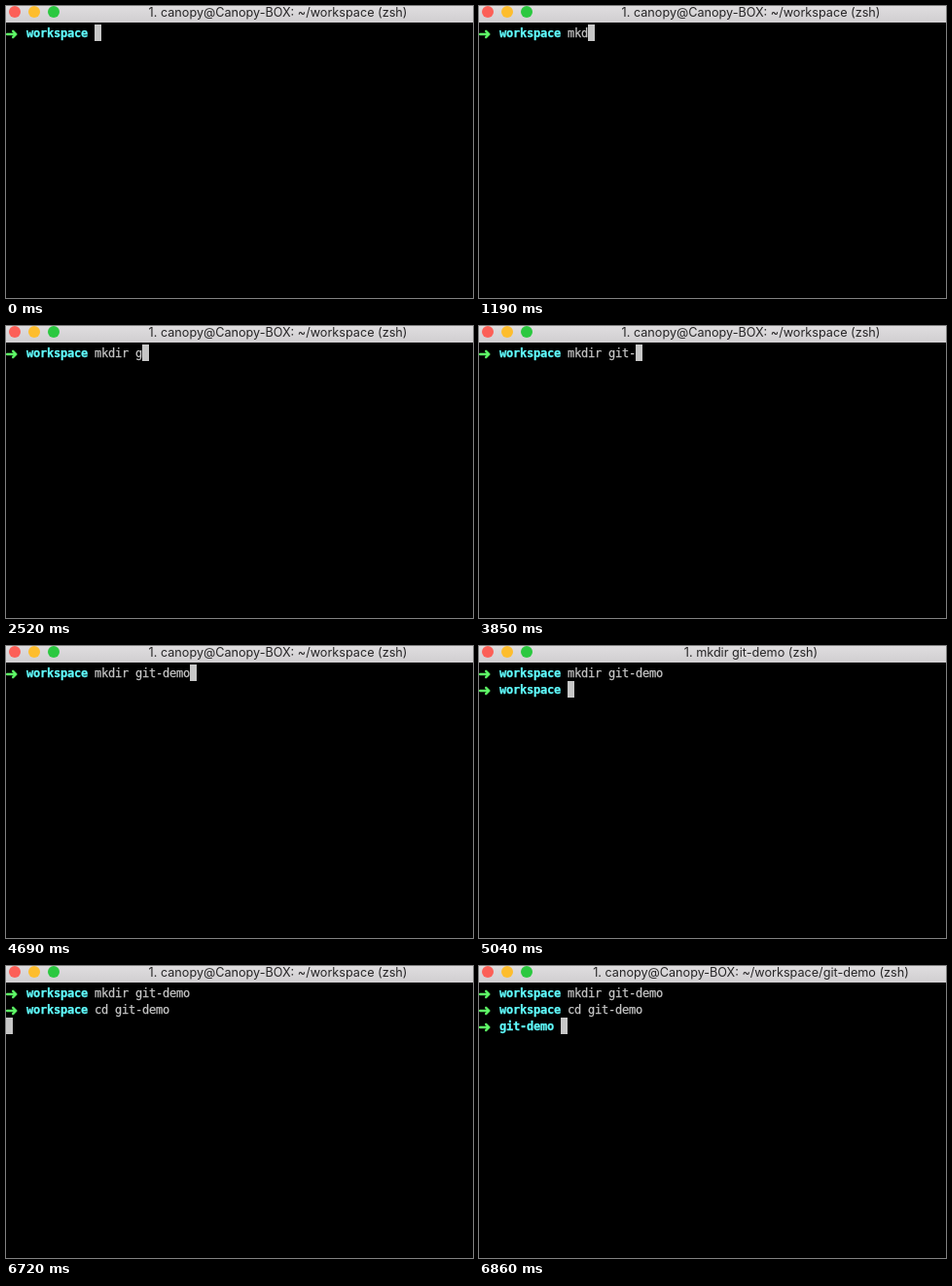
These frames come from a looping animation (480 by 300 pixels, 8 s). An HTML page:

```html
<!DOCTYPE html>
<html lang="en">
<head>
<meta charset="utf-8">
<title>Terminal</title>
<style>
  html, body { margin: 0; width: 100%; height: 100%; overflow: hidden; background: #000; }
  #stage { position: relative; width: 480px; height: 300px; overflow: hidden; background: #000; }
  #bar {
    position: absolute; inset: 0 0 auto; height: 17px;
    background: linear-gradient(#dfdddf, #d0ced0);
  }
  .light {
    position: absolute; top: 0; width: 12px; height: 12px; border-radius: 50%;
  }
  #title {
    position: absolute; left: 279.5px; top: -2px; transform: translateX(-50%);
    font: 12.65px/17px Inter, Roboto, sans-serif; color: #262526; white-space: pre;
  }
  #screen {
    position: absolute; left: 0; top: 19px; color: #c7c7c7;
    font: 12px/17px "DejaVu Sans Mono", "Noto Sans Mono", monospace;
  }
  .row { display: flex; height: 17px; white-space: pre; }
  .row span {
    position: relative; top: 1px; letter-spacing: calc(7px - 1ch);
    -webkit-text-stroke: .25px;
  }
  .row .arrow {
    left: -1px; width: 21px; letter-spacing: 0; color: #5ffa68;
    font: bold 16px/17px "DejaVu Sans", sans-serif; -webkit-text-stroke: .4px;
  }
  .row .dir { color: #60fdff; font-weight: bold; }
  .cursor { width: 7px; height: 17px; background: #c7c7c7; }
</style>
</head>
<body>
<div id="stage">
  <div id="bar">
    <i class="light" style="left:3px;background:#fc6058"></i>
    <i class="light" style="left:23px;background:#fdbd2e"></i>
    <i class="light" style="left:43px;background:#2bc840"></i>
    <div id="title"></div>
  </div>
  <div id="screen"></div>
</div>
<script>
  const LOOP = 8000;
  const HOST = 'canopy@Canopy-BOX: ~/workspace';
  const title = document.getElementById('title');
  const screen = document.getElementById('screen');

  // Each entry: time of the key press and the characters it adds.
  const mkdirKeys = [
    [490, 'm'], [700, 'k'], [1190, 'd'], [1330, 'i'], [1470, 'r'], [1680, ' '],
    [2520, 'g'], [2660, 'i'], [3150, 't'], [3850, '-'],
    [4200, 'd'], [4410, 'e'], [4620, 'm'], [4690, 'o']
  ];
  const cdKeys = [
    [5250, 'c'], [5390, 'd'], [5460, ' '], [5670, 'g'], [5810, 'i'], [5950, 't-demo/']
  ];

  // enter: the time of the newline, prompt: the time the shell is ready
  const lines = [
    { prompt: 0, dir: 'workspace', keys: mkdirKeys, enter: 4970 },
    { prompt: 5040, dir: 'workspace', keys: cdKeys, enter: 6720 },
    { prompt: 6790, dir: 'git-demo', keys: [], enter: LOOP }
  ];

  const typed = (keys, t) => keys.filter(k => k[0] <= t).map(k => k[1]).join('');

  const span = (cls, text) => `<span class="${cls}">${text}</span>`;

  function row(line, t) {
    const entered = t >= line.enter;
    let html = '';
    if (t >= line.prompt) {
      const cmd = typed(line.keys, t);
      html = span('arrow', '➜') + span('dir', line.dir) +
        span('cmd', ' ' + (entered ? cmd.replace(/\/$/, '') : cmd));
    }
    return `<div class="row">${html}${entered ? '' : '<b class="cursor"></b>'}</div>`;
  }

  function titleAt(t) {
    if (t >= 6860) return HOST + '/git-demo';
    if (t >= 6790) return 'cd git-demo';
    if (t >= 5040 && t < 5110) return 'mkdir git-demo';
    return HOST;
  }

  let shown = '';
  function draw(t) {
    const current = lines.findIndex(line => t < line.enter);
    const html = lines.slice(0, current + 1).map(line => row(line, t)).join('');
    const name = `1. ${titleAt(t)} (zsh)`;
    if (html + name === shown) return;
    shown = html + name;
    screen.innerHTML = html;
    title.textContent = name;
  }

  const start = performance.now();
  function tick() {
    draw((performance.now() - start) % LOOP);
    requestAnimationFrame(tick);
  }
  tick();
</script>
</body>
</html>
```
